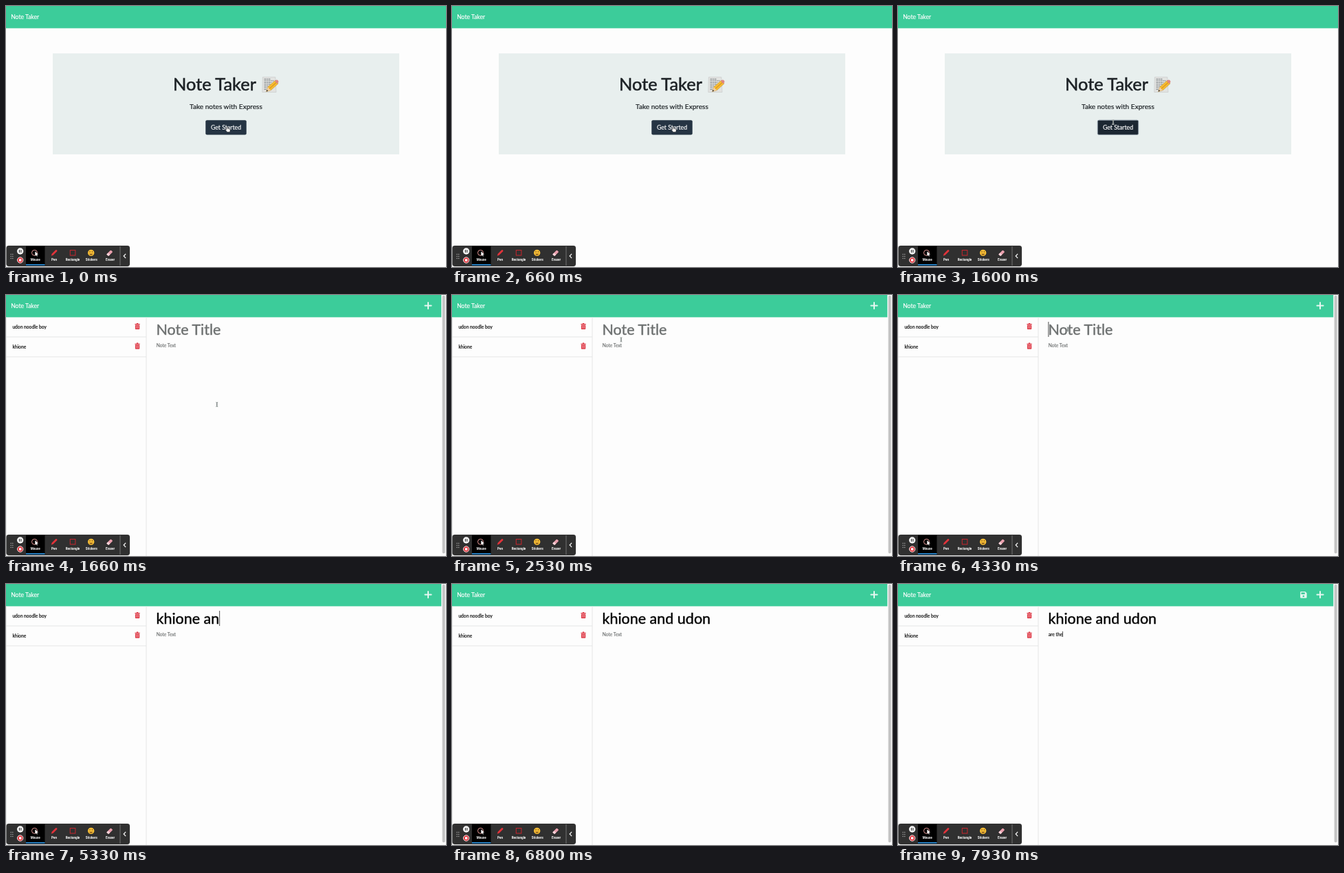
Animation of 640x380 px, one loop 8000 ms. Source, as an HTML page:

```html
<!DOCTYPE html>
<html lang="en">
<head>
<meta charset="utf-8">
<title>Note Taker</title>
<style>
  html, body { margin: 0; width: 100%; height: 100%; overflow: hidden; background: #fdfdfd; }
  svg { display: block; width: 100%; height: 100%; }
  /* A thin stroke gives the slightly heavy look of smoothed screen text. */
  text { font-family: Lato, sans-serif; white-space: pre; fill: currentColor; stroke: currentColor; stroke-width: .02em; }
  .mid { text-anchor: middle; }
  .brand { font-size: 8.6px; color: #fff; }
  .small { font-size: 6.7px; }
  .tool { font: bold 4.6px Roboto, sans-serif; color: #fff; stroke: none; text-anchor: middle; }
  #home { color: #1d2226; }
  #home .label { color: #fff; }
</style>
</head>
<body>
<svg viewBox="0 0 640 380">
  <defs>
    <g id="trash" fill="#de3b48">
      <path d="M0 1.2h2.2l.5-1.1h2l.5 1.1h2.2v1.1H0z"/>
      <path d="M.5 2.8h6.4v5.5q0 .9-.9.9H1.4q-.9 0-.9-.9z"/>
      <path d="M2.2 3.9v4M3.7 3.9v4M5.2 3.9v4" stroke="#f6bcc0" stroke-width=".6"/>
    </g>
    <path id="ibeam" d="M-1.4-3.2Q0-3.2 0-2.2V2.2Q0 3.2-1.4 3.2M1.4-3.2Q0-3.2 0-2.2V2.2Q0 3.2 1.4 3.2" fill="none"/>
  </defs>
  <rect width="640" height="380" fill="#fdfdfd"/>

  <g id="home">
    <rect width="640" height="32.4" fill="#3ccc9a"/>
    <rect x="68" y="69" width="504" height="147" fill="#e8efee"/>
    <text x="243" y="122.7" font-size="25.4">Note Taker</text>
    <g>
      <path d="M373.3 103.6h18.5l1.2 21.9h-20.2z" fill="#e2e3e1" stroke="#c4c7c6" stroke-width=".6"/>
      <path d="M375.5 106.4h9M375.5 108.9h14M375.5 111.4h11M375.5 113.9h10M375.5 116.4h7M375.5 118.9h5M375.5 121.4h4" stroke="#777d80" stroke-dasharray="3 .7 2 .5"/>
      <path d="M378.6 124.5l2.2-6.6 10.9-9.6 4.2 4.8-10.8 9.7z" fill="#f6bd30" stroke="#b98528" stroke-width=".5"/>
      <path d="M382.8 120.6l11-9.8" stroke="#dc9222" stroke-width="1.2"/>
      <path d="M378.6 124.5l2.2-6.6 4.3 4.9z" fill="#f0cfa0"/>
      <path d="M378.6 124.5l.9-2.7 1.7 1.9z" fill="#333"/>
      <path d="M390.8 109.1l1.3-1.1q2.1-1.3 3.7.5 1.6 2-.2 3.6l-1.2 1.1z" fill="#de8783"/>
    </g>
    <text class="mid" x="320" y="149.5" font-size="10.1">Take notes with Express</text>
    <rect id="button" x="290.3" y="166.2" width="59.4" height="21.2" rx="2"/>
    <text class="mid label" x="320" y="180" font-size="8.75">Get Started</text>
  </g>

  <g id="notes">
    <rect width="633.5" height="32.4" fill="#3ccc9a"/>
    <path d="M.3 32.4V380M0 61H204M0 90H204M204 32.4V380" stroke="#e2e4e4" stroke-width=".9"/>
    <text class="small" x="9.4" y="49.2">udon noodle boy</text>
    <text class="small" x="9.4" y="77.8">khione</text>
    <use href="#trash" x="187.4" y="40.8"/>
    <use href="#trash" x="187.4" y="69.5"/>
    <text id="title" x="218.5" y="58" font-size="21.5"></text>
    <text id="body" class="small" x="218.7" y="75.5"></text>
    <rect id="caret" width=".8" fill="#222"/>
    <path d="M614 10.9V20.1M609.4 15.5H618.6" stroke="#e4f7f0" stroke-width="2" stroke-linecap="round"/>
    <g id="save">
      <path d="M586.3 11h6l2.3 2.3v6q0 1.2-1.2 1.2h-7.1q-1.2 0-1.2-1.2v-7.1q0-1.2 1.2-1.2z" fill="#e4f7f0"/>
      <path d="M586.5 12.3h5.3v2.6h-5.3z" fill="#3ccc9a"/>
      <circle cx="589.8" cy="17.7" r="1.3" fill="#3ccc9a"/>
    </g>
    <rect x="633.5" width="6.5" height="380" fill="#fafafa"/>
    <rect x="634.7" y=".8" width="4" height="375.5" rx="2" fill="#c3c3c3"/>
  </g>
  <text class="brand" x="7.2" y="19">Note Taker</text>

  <g id="toolbar">
    <rect x=".6" y="349" width="179.4" height="30" rx="3.4" fill="#303030" stroke="#000" stroke-opacity=".2" stroke-width=".8"/>
    <path d="M7.2 361.5v6.5M9.8 361.5v6.5" stroke="#bbb" stroke-width="1.3" stroke-linecap="round" stroke-dasharray="0 3"/>
    <circle cx="20.7" cy="357" r="4.7" fill="#f4f4f4"/>
    <path d="M19.5 355v4M21.9 355v4" stroke="#333" stroke-width="1.1"/>
    <circle cx="20.7" cy="370" r="4.2" fill="#e0343c" stroke="#f0e0e0"/>
    <rect x="19" y="368.3" width="3.4" height="3.4" fill="#fff"/>
    <rect x="29" y="349.6" width="27.5" height="28.6" fill="#000"/>
    <rect x="29" y="376" width="27.5" height="1.6" fill="#2b97e8"/>
    <circle cx="41.5" cy="359.3" r="4" fill="none" stroke="#e89a98"/>
    <path d="M42.3 357.2l4.6 4.5-2 .2 1.1 2.2-1.1.5-1-2.2-1.5 1.3z" fill="#fff"/>
    <path d="M65.7 363.8l1-3 5.500-5.500q1-.7 1.900.2.8.9 0 1.800l-5.500 5.500z" fill="#e0333a"/>
    <rect x="93.3" y="355.6" width="7.6" height="7.4" fill="none" stroke="#c9262e"/>
    <circle cx="123.7" cy="359.4" r="4.7" fill="#f5bd35"/>
    <path d="M121.2 360.7h5q-.4 2-2.500 2t-2.500-2z" fill="#8a5a20"/>
    <path d="M122 357v1.500M125.400 357v1.500" stroke="#6d3f18"/>
    <path d="M146.8 361l4.8-5q.8-.7 1.600 0l1.400 1.300q.7.7 0 1.500l-4.800 4.700q-.7.6-1.400 0l-1.600-1.200q-.6-.6 0-1.300z" fill="#eba0ae"/>
    <path d="M146.8 361l1.600-1.600 2.900 2.700-1.500 1.400q-.7.6-1.400 0l-1.600-1.200q-.6-.6 0-1.300z" fill="#f5d5da"/>
    <text class="tool" x="42.7" y="371.4">Mouse</text>
    <text class="tool" x="70" y="371.4">Pen</text>
    <text class="tool" x="97" y="371.4">Rectangle</text>
    <text class="tool" x="124.3" y="371.4">Stickers</text>
    <text class="tool" x="151.7" y="371.4">Eraser</text>
    <path d="M166 350V378" stroke="#858585" stroke-width=".8"/>
    <path d="M174.2 360.8l-3 3.200 3 3.200" fill="none" stroke="#fff" stroke-width="1.2"/>
  </g>

  <path id="hand" d="M-1.4-3.5q.9-1 1.6 0v2.5l2.5.6q1.1.4.9 1.500l-.5 2.900h-3.900l-2.300-3.100q-.3-1.100.7-.9l1 .6z" fill="#fff" stroke="#222" stroke-width=".5"/>
  <g id="beam">
    <use href="#ibeam" stroke="#fff" stroke-width="1.5"/>
    <use href="#ibeam" stroke="#66706e" stroke-width=".8"/>
  </g>
</svg>
<script>
  const LOOP = 8000, FOCUS = 1260, MOVE = 1530, NAVIGATE = 1660;
  const CLICK = 3330, TAB = 6260, SAVE = 7260;
  const titleField = {
    value: "khione and udon", hint: "Note Title", top: 39, height: 22,
    keys: [4600, 4660, 4730, 4800, 4860, 4930, 5060, 5200, 5330, 5400, 5460, 5600, 5800, 5860, 5930]
  };
  const bodyField = {
    value: "are the", hint: "Note Text", top: 69, height: 8,
    keys: [7130, 7400, 7460, 7600, 7730, 7800, 7870]
  };
  const cursorPath = [[MOVE, 322.5, 179.5], [1600, 313, 169], [2260, 246, 65], [2530, 246, 65], [2800, 247, 50]];

  const el = id => document.getElementById(id);
  titleField.node = el("title");
  bodyField.node = el("body");
  const show = (id, on) => el(id).style.display = on ? "" : "none";
  const within = (t, from, to) => t >= from && t < to;

  function cursorAt(t) {
    const next = cursorPath.findIndex(point => point[0] > t);
    if (next < 1) return cursorPath.at(next).slice(1);
    const [t0, x0, y0] = cursorPath[next - 1], [t1, x1, y1] = cursorPath[next];
    const k = (t - t0) / (t1 - t0);
    return [x0 + (x1 - x0) * k, y0 + (y1 - y0) * k];
  }

  function fill({ node, value, hint, keys }, t) {
    const typed = value.slice(0, keys.filter(key => key <= t).length);
    node.textContent = typed || hint;
    node.style.color = typed ? "#050505" : "#6d7070";
    return typed;
  }

  function placeCaret(field, typed) {
    const x = Number(field.node.getAttribute("x"));
    const width = typed ? field.node.getComputedTextLength() : 0;
    el("caret").setAttribute("x", x + width);
    el("caret").setAttribute("y", field.top);
    el("caret").setAttribute("height", field.height);
  }

  function draw(t) {
    const onNotes = t >= NAVIGATE;
    show("home", !onNotes);
    show("notes", onNotes);

    const focused = t >= FOCUS;
    el("button").setAttribute("fill", focused ? "#1c2732" : "#253443");
    el("button").setAttribute("stroke", focused ? "#8b98a3" : "none");

    const title = fill(titleField, t), body = fill(bodyField, t);
    if (t < TAB) placeCaret(titleField, title);
    else placeCaret(bodyField, body);
    show("caret", t >= CLICK && !within(t, 3860, 4330) && !within(t, 6800, 7130));
    show("save", t >= SAVE);

    const [x, y] = cursorAt(t);
    show("hand", t < MOVE);
    show("beam", within(t, MOVE, titleField.keys[0]));
    for (const id of ["hand", "beam"]) el(id).setAttribute("transform", `translate(${x} ${y})`);
  }

  const start = performance.now();
  function frame() {
    draw((performance.now() - start) % LOOP);
    requestAnimationFrame(frame);
  }
  frame();
</script>
</body>
</html>
```
